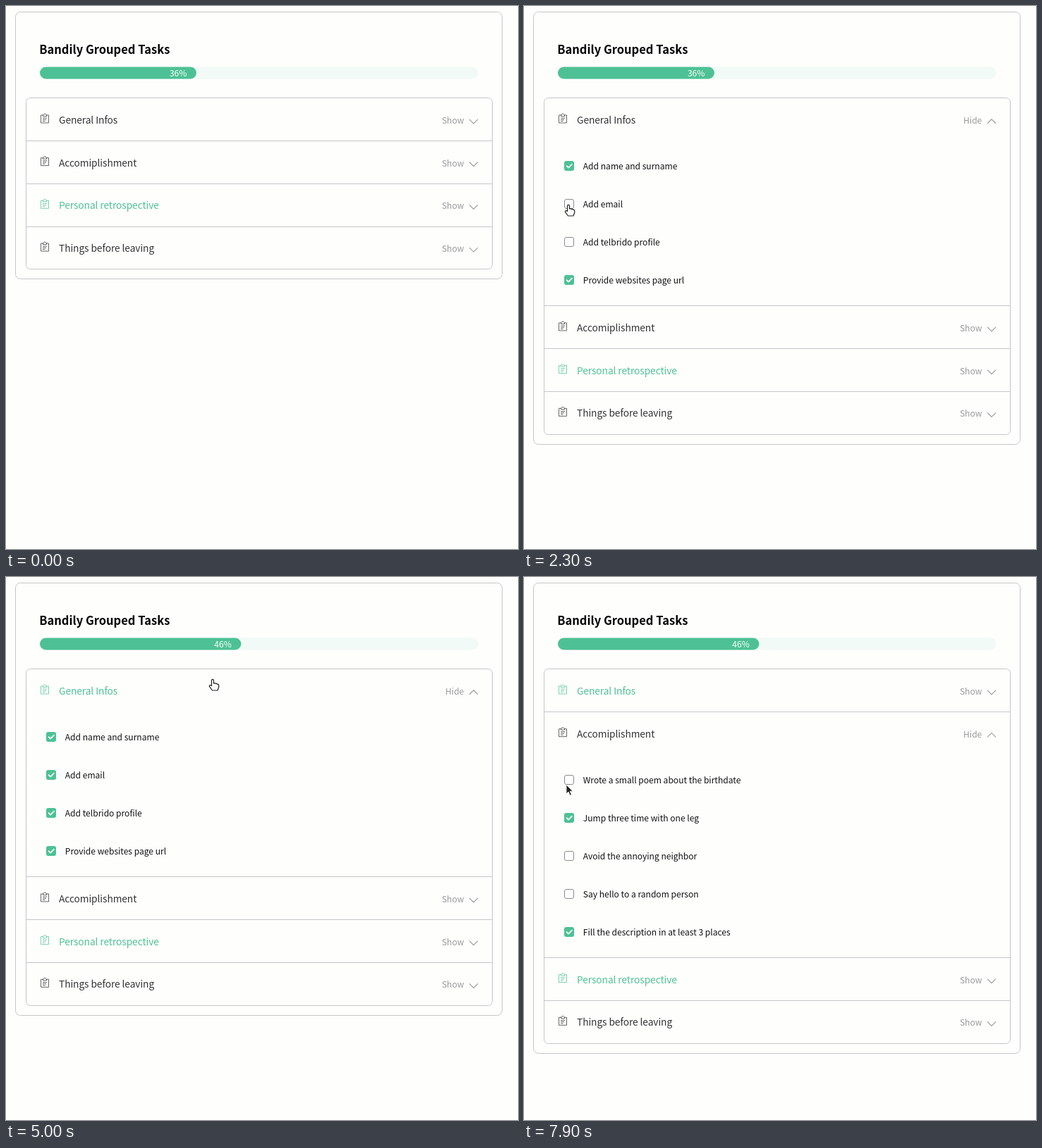
Animation of 726 by 771 pixels, one loop 8000 ms. Source, as an HTML page:

```html
<!DOCTYPE html>
<html lang="en">
<head>
<meta charset="utf-8">
<title>Grouped tasks</title>
<style>
  html, body { margin: 0; width: 100%; height: 100%; overflow: hidden; background: #fefefd; }
  svg { display: block; font: 12.06px "Noto Sans CJK JP", "Noto Sans CJK SC", "Noto Sans CJK KR", "Noto Sans", sans-serif; }
  .heading { font-size: 16.5px; font-weight: 700; }
  .title { font-size: 13.78px; letter-spacing: -.09px; }
  .line { fill: none; stroke: #c6c6c8; }
  .toggle { fill: #999; text-anchor: end; }
  .percent { fill: #fff; text-anchor: end; }
  .icon { fill: none; stroke-width: .75; }
  .chevron { fill: none; stroke: #999; stroke-width: 1.1; }
  .tick { fill: none; stroke: #fff; stroke-width: 1.7; stroke-linecap: round; stroke-linejoin: round; }
  .hand { fill: #fff; stroke: #222; stroke-width: 1.2; stroke-linejoin: round; }
  .arrow { fill: #222; stroke: #fff; stroke-width: .8; }
</style>
</head>
<body>
<svg id="stage" width="726" height="771" viewBox="0 0 726 771"></svg>
<script>
const LOOP = 8000, STEP = 100, NEVER = Infinity;
const GREEN = '#4dc195', DARK = '#333';
const LIST_TOP = 130.95, ROW = 60.7, TASK = 54, FIRST_TASK = 96.3;
const BAR_WIDTH = 621.5, START_POINTS = 70, ALL_POINTS = 196;

// Tasks: label, time of completion, points gained by it
const groups = [
  { title: 'General Infos', opens: 1300, closes: 5800, tasks: [
    ['Add name and surname', 0], ['Add email', 3000, 13],
    ['Add telbrido profile', 4300, 7], ['Provide websites page url', 0]] },
  { title: 'Accomiplishment', opens: 7300, closes: LOOP, tasks: [
    ['Wrote a small poem about the birthdate', NEVER], ['Jump three time with one leg', 0],
    ['Avoid the annoying neighbor', NEVER], ['Say hello to a random person', NEVER],
    ['Fill the description in at least 3 places', 0]] },
  { title: 'Personal retrospective', done: true },
  { title: 'Things before leaving', done: false },
];

// Pointer strokes: start time, end time, goal, and a point the curve bends towards
const pointerStart = [516, 386];
const strokes = [
  [500, 1000, [632, 162], [790, 215]],
  [1600, 2300, [63, 282], [130, 310]],
  [3100, 3300, [66, 330]],
  [3400, 3500, [59, 350]],
  [3500, 4300, [66, 333], [38, 342]],
  [4500, 5000, [293, 145]],
  [5000, 5400, [142, 159], [420, 115]],
  [6100, 6500, [129, 223]],
  [7400, 7500, [52, 359]],
  [7600, 7900, [60, 295], [35, 335]],
];

const snap = y => Math.floor(y) + .5;
const mix = (a, b, k) => a.map((v, i) => v + (b[i] - v) * k);

function pointerAt(t) {
  if (t < strokes[0][0]) return null;
  let from = pointerStart;
  for (const [start, end, goal, bend = mix(from, goal, .5)] of strokes) {
    if (t < start) break;
    const u = Math.min(1, (t - start) / (end - start));
    const k = u * u * (3 - 2 * u);
    from = mix(mix(from, bend, k), mix(bend, goal, k), k);
  }
  return from;
}

function clipboard(y, color) {
  return `<path class="icon" stroke="${color}" transform="translate(49 ${y + 21.5})"
    d="M3.5 2.5H.5V13.5H11.5V2.5H8.5M3.5 4V2L6 .4 8.5 2V4ZM3 6.6H9M3 8.8H8M3 11H6.5"/>`;
}

function checkbox(y, checked) {
  return checked
    ? `<rect x="57" y="${y - 7}" width="14" height="14" rx="3" fill="${GREEN}"/>
       <path class="tick" d="M60.6 ${y + .2}l2.5 2.5 4.8-5"/>`
    : `<rect x="57.5" y="${y - 6.5}" width="13" height="13" rx="2.5" fill="#fff" stroke="#8b8b8b"/>`;
}

function cursor([x, y], hand) {
  const shape = hand
    ? 'M-1.5 9.5V1.6Q-1.5.4 0 .4 1.5.4 1.5 1.6V6Q3.2 5 4 6.5 5.6 5.7 6.4 7.2 8.7 6.8 8.7 9V11.5L7 16H-.5L-4.6 10.4Q-4.8 8.3-3 8.5Z'
    : 'M0 0V12.8L3 10 5.2 15.2 7.4 14.2 5.2 9.2H9.2Z';
  return `<path class="${hand ? 'hand' : 'arrow'}" transform="translate(${x} ${y})" d="${shape}"/>`;
}

function draw(t) {
  const tip = pointerAt(t);
  let y = LIST_TOP, points = START_POINTS, rows = '', hand = false;
  const hover = (x0, y0, x1, y1) => {
    hand ||= tip && tip[0] >= x0 && tip[0] <= x1 && tip[1] >= y0 && tip[1] <= y1;
  };

  groups.forEach(({ title, opens, closes, tasks = [], done }, i) => {
    const isOpen = t >= opens && t < closes;
    const color = done ?? tasks.every(task => t >= task[1]) ? GREEN : DARK;
    if (i) rows += `<path class="line" d="M28.5 ${snap(y)}H689.5"/>`;
    rows += clipboard(y, color) +
      `<text class="title" x="75" y="${y + 36}" fill="${color}">${title}</text>
       <text class="toggle" x="649.3" y="${y + 36}">${isOpen ? 'Hide' : 'Show'}</text>
       <path class="chevron" d="M657 ${y + (isOpen ? 35.8 : 30)}l6 ${isOpen ? -6 : 6} 6 ${isOpen ? 6 : -6}"/>`;
    hover(28, y, 690, y + ROW);
    tasks.forEach(([label, doneAt, gain = 0], n) => {
      if (t >= doneAt) points += gain;
      if (!isOpen) return;
      const center = Math.round(y + FIRST_TASK + n * TASK);
      rows += checkbox(center, t >= doneAt) + `<text x="83.8" y="${center + 4.7}" fill="#111">${label}</text>`;
      hover(57, center - 6, 71, center + 6);
    });
    y += ROW + (isOpen ? 18.3 + tasks.length * TASK : 0);
  });

  const top = snap(LIST_TOP), bottom = snap(y), share = points / ALL_POINTS;
  const bar = (width, color) => `<rect x="48" y="86.5" width="${width}" height="17" rx="8.5" fill="${color}"/>`;
  stage.innerHTML =
    `<rect class="line" x="13.5" y="8.5" width="690" height="${bottom + 5.5}" rx="7"/>
     <text class="heading" x="47.3" y="68.3">Bandily Grouped Tasks</text>` +
    bar(BAR_WIDTH, '#f1faf6') + bar(BAR_WIDTH * share, GREEN) +
    `<text class="percent" x="${34.4 + BAR_WIDTH * share}" y="100.4">${Math.round(share * 100)}%</text>
     <rect class="line" x="28.5" y="${top}" width="661" height="${bottom - top}" rx="6"/>` +
    rows + (tip ? cursor(tip, hand) : '');
}

const stage = document.getElementById('stage');
let shown = -1;
function tick() {
  const t = Math.floor(performance.now() % LOOP / STEP) * STEP;
  if (t !== shown) draw(shown = t);
  requestAnimationFrame(tick);
}
tick();
</script>
</body>
</html>
```
